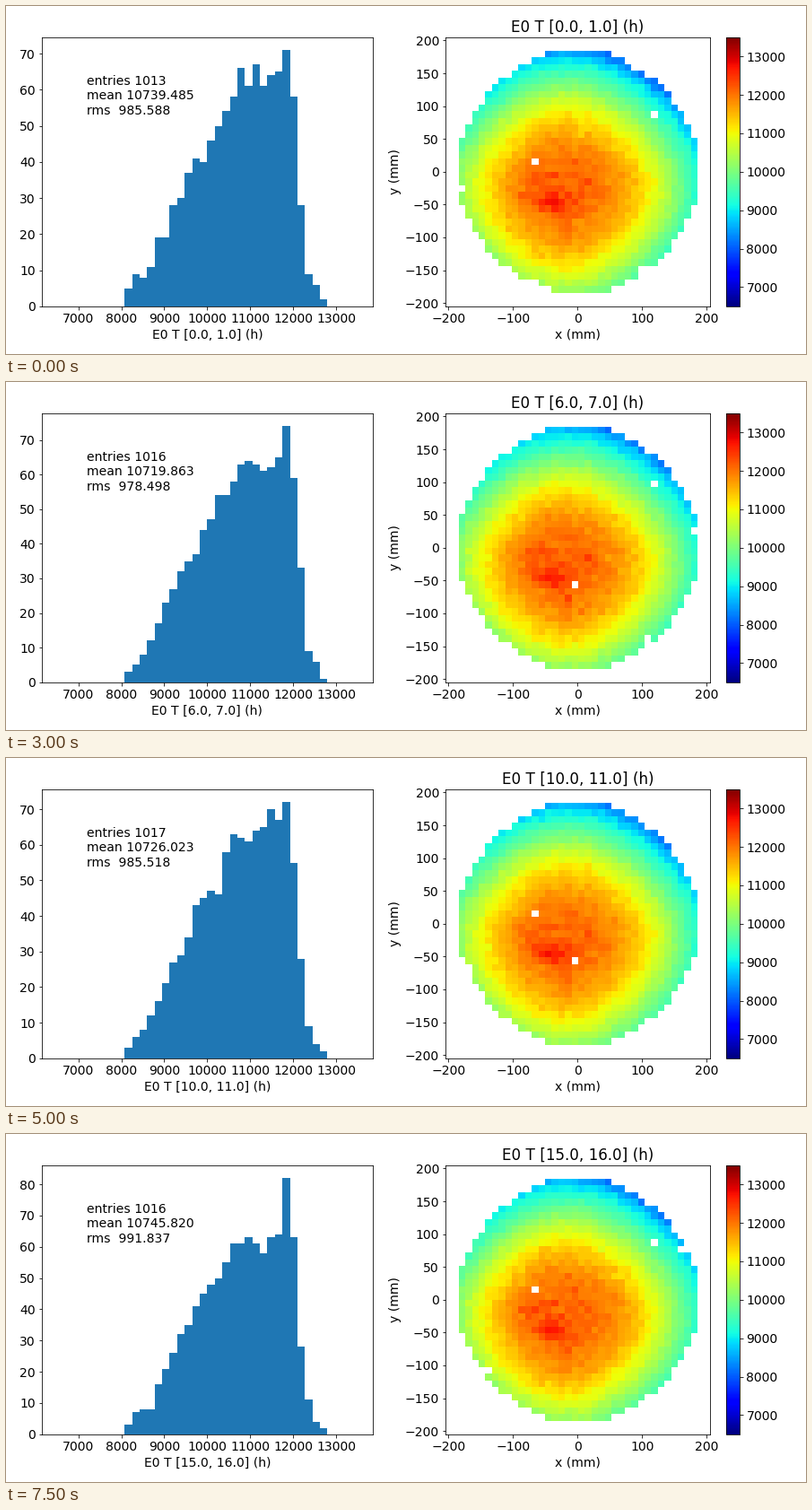
A matplotlib script for the animation above (8000 ms loop, 892 px wide and 388 px high).

```python
import numpy as np
import matplotlib.pyplot as plt
from matplotlib.animation import FuncAnimation

W, H, DPI = 892, 388, 72
HOURS, STEP_MS = 16, 500
E_MIN, E_MAX, BINS = 6500, 13500, 40
R_MAX, CELLS = 205, 40
PEAK_BIN = 30

plt.rcParams.update({"font.family": "DejaVu Sans", "font.size": 14})

# slow drift of the run: hour, entries, mean, rms, highest bar
DRIFT = np.array([
    (0, 1013, 10739.485, 985.588, 71),
    (2, 1011, 10730.776, 981.108, 88),
    (4, 1016, 10720.799, 978.242, 74),
    (7, 1016, 10719.395, 978.626, 74),
    (9, 1017, 10723.385, 984.844, 72),
    (12, 1018, 10731.300, 986.865, 72),
    (15, 1016, 10745.820, 991.837, 82),
])
# typical bar heights: a slow rise, then a steep fall
PROFILE = np.array([(8, 0), (9, 4), (12, 11), (15, 27), (20, 48), (24, 61),
                    (31, 62), (32, 27), (33, 9), (35, 2), (36, 0)])
DEAD = [(31, 10), (31, 11), (13, 18), (19, 25)]  # column, row from the top


def run_state(hour):
    entries, mean, rms, peak = (np.interp(hour, DRIFT[:, 0], col)
                                for col in DRIFT.T[1:])
    return round(entries), mean, rms, round(peak)


def bar_heights(rng, entries, peak):
    """Profile with counting noise, adding up to the number of entries."""
    bars = np.interp(np.arange(BINS), *PROFILE.T)
    bars += rng.normal(0, 0.4, BINS) * np.sqrt(bars)
    bars = np.clip(np.rint(bars), 0, peak - 3).astype(int)
    bars[PEAK_BIN] = peak
    middle = np.arange(16, 30)
    while bars.sum() != entries:
        step = np.sign(entries - bars.sum())
        i = rng.choice(middle)
        if bars[i] + step < peak:
            bars[i] += step
    return bars


# ---- energy map -------------------------------------------------------------
offset = np.arange(CELLS) - (CELLS - 1) / 2
reach = np.abs(offset) ** 1.9
disc = reach[:, None] + reach[None, :] < 18.2 ** 1.9
inner = np.logical_and.reduce(
    [np.roll(disc, s, axis) for s in (-1, 1) for axis in (0, 1)])
edge_cells = np.argwhere(disc & ~inner)

mm = offset * 2 * R_MAX / CELLS
X, Y = np.meshgrid(mm, -mm)


def bump(x, y, sx, sy, height):
    return height * np.exp(-((X - x) / sx) ** 2 - ((Y - y) / sy) ** 2)


u = (X + 20) * np.where(X > -20, 0.97, 1)
v = (Y + 25) * np.where(Y > -25, 1.07, 1.02)
lobes = 1 - 0.025 * np.cos(4 * np.arctan2(v, u))
shape = 12150 - 3900 * (np.hypot(u, v) * lobes / 205) ** 2.4
shape += bump(-40, -46, 24, 12, 420) + bump(-75, -15, 28, 28, 170)
shape += bump(-20, -100, 8, 40, 150) + bump(85, -10, 28, 12, 100)
shape += np.random.default_rng(5).normal(0, 60, shape.shape)


def energy_map(rng, energy):
    """Hand the energies to the cells in order of the fixed shape."""
    filled = disc.copy()
    missing = disc.sum() - len(energy)
    for i in rng.choice(len(DEAD), 2, replace=False):
        col, row = DEAD[i]
        filled[row, col] = False
    for i in rng.choice(len(edge_cells), missing - 2, replace=False):
        filled[tuple(edge_cells[i])] = False

    noisy = shape + rng.normal(0, 50, shape.shape)
    ranks = noisy[filled].argsort().argsort()
    grid = np.full(shape.shape, np.nan)
    grid[filled] = np.sort(energy)[ranks]
    return grid


# ---- figure -----------------------------------------------------------------
fig = plt.figure(figsize=(W / DPI, H / DPI), dpi=DPI, facecolor="white")
WIDTH, HEIGHT, BOTTOM = 368.9, 300, 53.2
MAP_X = 489.9


def panel(x, width):
    return fig.add_axes([x / W, BOTTOM / H, width / W, HEIGHT / H])


hist_ax = panel(39.9, WIDTH)
map_ax = panel(MAP_X, 0.8 * WIDTH)
bar_ax = panel(MAP_X + 0.85 * WIDTH, HEIGHT / 20)

image = map_ax.imshow(np.full((CELLS, CELLS), np.nan), cmap="jet",
                      vmin=E_MIN, vmax=E_MAX, aspect="auto",
                      interpolation="nearest",
                      extent=[-R_MAX, R_MAX, -R_MAX, R_MAX])
map_ax.set_xlabel("x (mm)")
map_ax.set_ylabel("y (mm)")
fig.colorbar(image, cax=bar_ax)


def update(hour):
    rng = np.random.default_rng(100 + hour)
    entries, mean, rms, peak = run_state(hour)
    bars = bar_heights(rng, entries, peak)
    within = rng.uniform(0.02, 0.98, entries)
    energy = E_MIN + (E_MAX - E_MIN) / BINS * (
        np.repeat(np.arange(BINS), bars) + within)
    label = f"E0 T [{hour:.1f}, {hour + 1:.1f}] (h)"

    hist_ax.clear()
    hist_ax.hist(energy, bins=BINS, range=(E_MIN, E_MAX), color="#1f77b4")
    hist_ax.set_xlim(E_MIN - 350, E_MAX + 350)
    hist_ax.set_ylim(0, 1.05 * peak)
    hist_ax.set_xlabel(label)
    hist_ax.text(7200, 0.75 * peak,
                 f"entries {entries}\nmean {mean:.3f}\nrms  {rms:.3f}")

    image.set_data(energy_map(rng, energy))
    map_ax.set_title(label)
    return []


anim = FuncAnimation(fig, update, frames=HOURS, interval=STEP_MS,
                     repeat=True, repeat_delay=0, blit=False)
plt.show()
```
